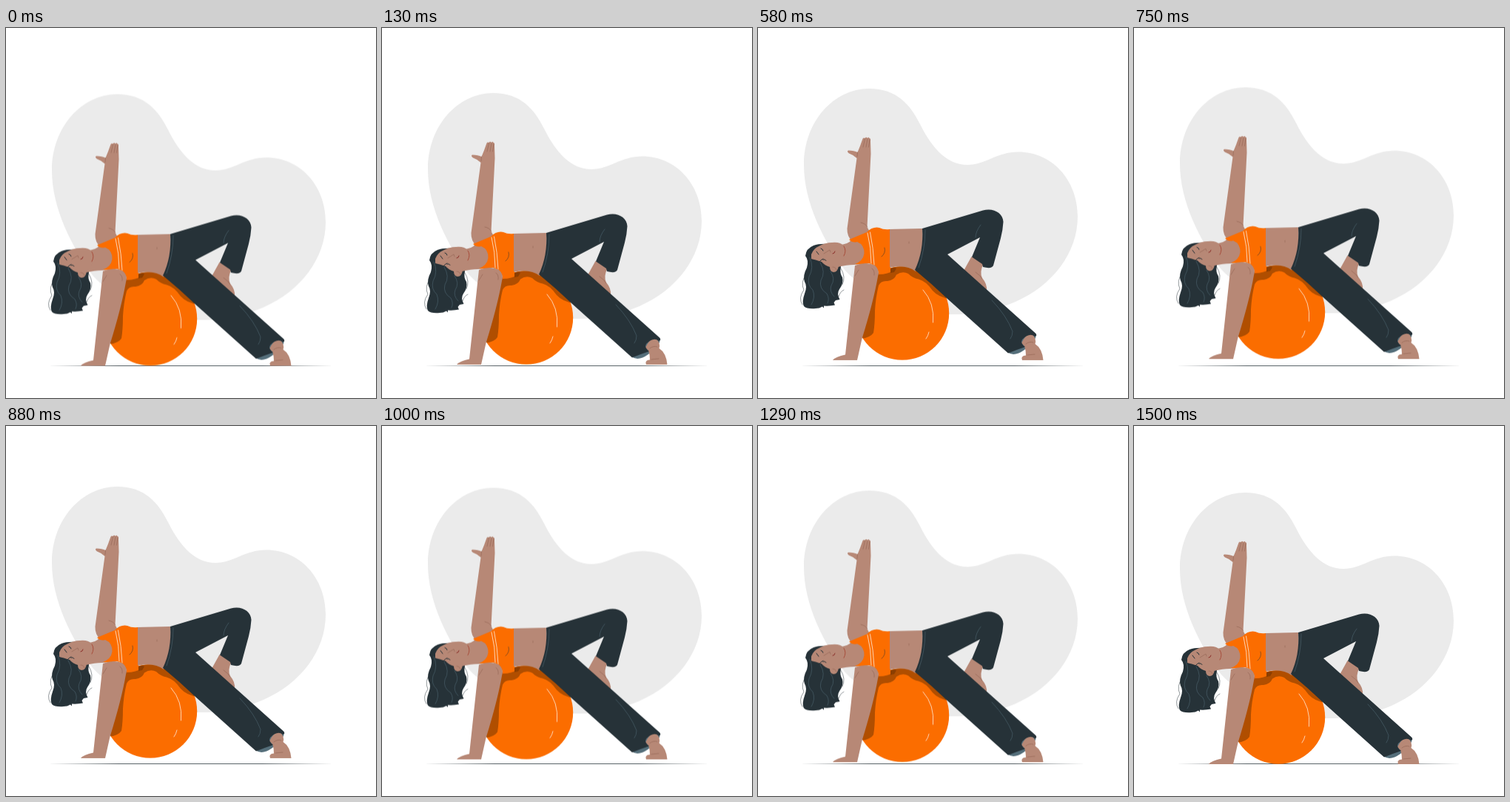
These frames come from a looping animation (500x500 px, 1540 ms). An HTML page:

```html
<!DOCTYPE html>
<html lang="en">
<head>
<meta charset="utf-8">
<title>Ball exercise</title>
<style>
  html, body { margin: 0; width: 100%; height: 100%; overflow: hidden; background: #fff; }
  svg { display: block; width: 100%; height: 100%; }
  .skin { fill: #b78876; }
  .dark { fill: #263238; }
  .orange { fill: #fb6d00; }
  .line { fill: none; stroke-width: .5; stroke-linecap: round; stroke-linejoin: round; }
  .bold { stroke-width: 1; }
  .ink { stroke: #263238; }
  .seam { stroke: #56707c; }
  .crease { stroke: #8a5c4c; }
  .white { stroke: #fff; stroke-width: .7; }
</style>
</head>
<body>
<svg viewBox="0 0 500 500">
  <defs>
    <clipPath id="ballClip"><circle cx="195" cy="393.5" r="63.2"/></clipPath>
  </defs>

  <path class="dark" d="M57 456.600L153 456.300L250 456.200L346 456.300L442 456.600L346 456.900L250 457L153 456.900Z"/>

  <g id="float">
    <path fill="#ebebeb" d="M62 193C62 135 102 90 150 90C188 90 206 112 219 138C236 172 256 193 283 193C307 193 323 175.5 352 175.5C396 175.5 432 212 432 263C432 312 398 356 348 378C312 393 282 395.5 258 395C205 393 150 370 118 336C90 298 62 245 62 193Z"/>

    <!-- ball -->
    <circle class="orange" cx="195" cy="393.5" r="63.2"/>
    <path clip-path="url(#ballClip)" fill="#b04e00" d="M128 430L150 325H215L264 374Q246 374 236 363Q227 350 217 347.500Q209 346 203 340Q195 336 187 341.500Q184 349 175 350Q166 349 163 356Q159 372 158 390Q158 408 156 420Q152 426 140 428Z"/>
    <path class="line white" d="M223 362Q239 380 236.500 406M231 419Q230 424 227 428"/>

    <!-- hair -->
    <path class="dark" d="M96 300Q83 299 75 302Q65 306 64 316Q69 322 66 332Q60 343 63 351Q67 357 63 367Q59 378 62 384Q66 388 78 387Q83 387 87 384.500L89 386.500L89 383.500Q97 384 104 382.500L102.500 379L105 376L110.500 375Q106 367 110 361Q116 353 114 345Q110 339 112 331L108 308Z"/>
    <path class="line ink" d="M65 341Q57 352 62 362Q54 373 60 382M112 333Q119 344 114 355M109 371Q111 364 116 362"/>
    <path class="line seam" d="M70 318Q76 332 69 344Q66 355 74 362Q78 372 72 382M84 325Q92 338 85 349Q82 360 93 367Q97 374 94 380M98 337Q105 347 99 356Q96 364 103 371"/>

    <!-- neck and face -->
    <path class="skin" d="M105 301Q122 302 127 293L146 293L148 326L130 328Q120 328 108 331Z"/>
    <path class="skin" d="M72 314Q75 306 82 303Q91 298 100 298Q111 297 115 302Q119 313 115 323L109 329Q108 338 102 338Q97 337 97 331Q90 329 86 324Q77 321 72 320Z"/>
    <path class="line bold" stroke="#a84e3c" d="M116 303Q120 309 116 316"/>
    <path class="line bold" stroke="#8c2f2a" d="M101 313Q103.500 313 104 310"/>
    <path class="line bold ink" d="M79 310L82 314M83 324Q85 321 88 320M85 306Q88 307 88 309M88 321Q91 320 92 322.500"/>
    <path class="line crease" d="M89 313L97 308L98 311M101 331Q105 331 106 335"/>

    <!-- raised arm -->
    <path class="skin" d="M120.500 279L133.500 184Q129 179.500 123 177.500Q119.500 174.500 122 173.500Q130 173.500 134.500 176Q138 168 141 159Q142 155.500 144.500 157Q146 154.500 148 157Q149.500 154.500 150.500 157Q152.500 157 152 161L152.500 178L147.500 277L160 300L128 297Q120 290 120.500 279Z"/>
    <path class="line crease" d="M144.500 158L142 169M148 158L146 169M151 159L149.500 169M134.500 176L134 182M139 271Q145 272 148 277"/>

    <!-- torso -->
    <path class="skin" d="M177 280L222 279Q225 310 213 337Q200 327 177 332Z"/>
    <path class="line crease" d="M204 297V299"/>
    <path class="orange" d="M123 294L147 284Q155 276 164 278Q170 281 178 280L178 331L184 335Q176 341 163 341Q162 329 150 326Q140 328 131 327Q142 323 143.500 313Q144 301 134 297Q128 299 123 294Z"/>
    <path fill="#8c3e00" d="M179 333Q184 331 187 333L184 338L179 339Z"/>
    <path class="line white" d="M148 285Q153 305 153 326M151.500 284Q156 305 157 328"/>
    <path class="line ink" d="M171 305Q173 312 167 317"/>

    <!-- supporting arm -->
    <path class="skin" d="M131 329Q147 323 158 329Q165 335 162 344Q156 378 140.500 428L134 457H101Q105 452 118 449.500L130 338Z"/>
    <path class="line crease" d="M154 333Q158 336 157 342M131 343Q134 338 136 335"/>

    <!-- feet -->
    <path class="skin" d="M288.500 317L305 326Q299 338 303 346Q310 354 309 363L278 336Z"/>
    <path class="line crease" d="M294 338Q300 342 303 347"/>
    <path fill="#546e7a" d="M337 446Q346 453 360 443L375 427L376 422L370 419L345 432Z"/>
    <path class="skin" d="M356 434Q362 421 370 421.500Q377 428 374.500 435Q384 441 385.500 457H357Q354.500 451 362 450.500Q362 443 360 438Z"/>
    <path class="line crease" d="M362 435Q367 431 372 433M364 450L374 449"/>

    <!-- trousers -->
    <path class="dark" d="M222 279L304 254.500C318 250.500 331 258 331.500 270Q331 280 328 292L318 329Q316 334 304 331L303 327L289 317.500L300 291L256 314L375 420.500Q378 424 374 425Q367 419 357 429Q354 434 361 439Q349 443 338 447.500L256 374Q234 353 212 335Q224 310 222 279Z"/>
    <path class="line seam" d="M226 281Q226 307 217 332M301 274Q294 283 294 291M316 376Q336 397 344 418Q344 424 341 428"/>
  </g>
</svg>
<script>
  const LOOP = 1540, STEPS = 37, RISE = 10;

  // Even rise and fall, held at 24 steps per second on a 10 ms clock.
  const pose = i => {
    const p = ((i + 1) % STEPS) / STEPS;
    const y = -RISE * (1 - Math.abs(1 - 2 * p));
    return { transform: `translateY(${y}px)`, easing: "steps(1, end)" };
  };
  const start = i => Math.round(i * 100 / 24) * 10;

  const frames = Array.from({ length: STEPS }, (_, i) => ({ ...pose(i), offset: start(i) / LOOP }));
  frames.push({ ...pose(STEPS - 1), offset: 1 });
  document.getElementById("float").animate(frames, { duration: LOOP, iterations: Infinity });
</script>
</body>
</html>
```
